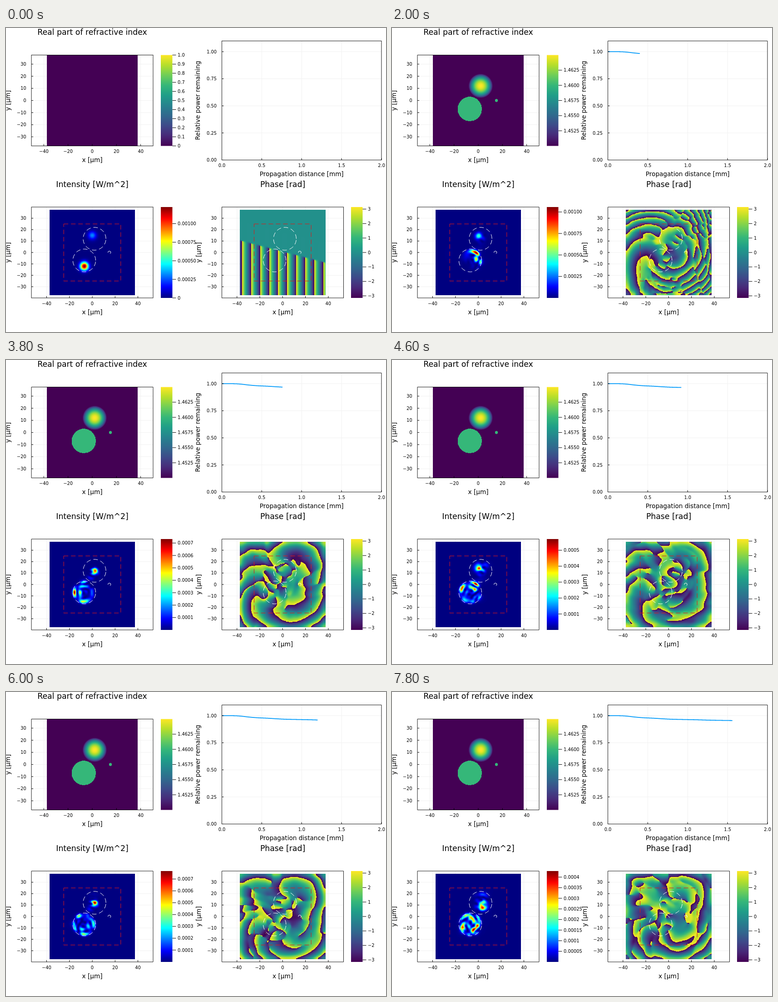
Recreate the animation shown at these times as an HTML page with a canvas. Size 837 by 669 pixels, loop 8000 ms.

```html
<!DOCTYPE html>
<html lang="en">
<head>
<meta charset="utf-8">
<title>Beam propagation</title>
<style>
html, body { margin: 0; width: 100%; height: 100%; overflow: hidden; background: #fff; }
canvas { display: block; }
</style>
</head>
<body>
<canvas id="stage" width="837" height="669"></canvas>
<script>
const ctx = document.getElementById('stage').getContext('2d');
const FRAME_MS = 200, FRAMES = 40, MM_PER_FRAME = 0.04;

// ---------- colour maps ----------
const VIRIDIS = ['440154', '482878', '3e4989', '31688e', '26828e', '1f9e89', '35b779', '6ece58', 'b5de2b', 'fde725']
  .map(hex => [0, 2, 4].map(i => parseInt(hex.slice(i, i + 2), 16)));
const clamp = v => Math.min(1, Math.max(0, v));
function viridis(v) {
  const s = clamp(v) * (VIRIDIS.length - 1), i = Math.min(VIRIDIS.length - 2, Math.floor(s));
  return VIRIDIS[i].map((a, c) => a + (VIRIDIS[i + 1][c] - a) * (s - i));
}
const jet = v => [3, 2, 1].map(c => 255 * clamp(1.5 - Math.abs(4 * clamp(v) - c)));
const table = map => Array.from({ length: 256 }, (_, i) => map(i / 255));
const viridisTable = table(viridis), jetTable = table(jet);

// ---------- beam propagation, lengths in µm ----------
const N = 150, H = 0.5, DZ = 2, FINE = 2 * N, STEPS_PER_FRAME = MM_PER_FRAME * 1000 / DZ;
const K0 = 2 * Math.PI, N0 = 1.46, ABSORB = 3e-4, WAIST = 5, TILT = -0.8;
const coord = (i, n) => (i - (n - 1) / 2) * 75 / n;

function indexAt(x, y) {
  if (Math.hypot(x + 7, y + 7) < 10 || Math.hypot(x - 15, y) < 1.25) return 1.46;
  return 1.45 + 0.015 * Math.max(0, 1 - ((x - 2) ** 2 + (y - 12) ** 2) / 100);
}

const re = new Float64Array(N * N), im = new Float64Array(N * N);
const mulRe = new Float64Array(N * N), mulIm = new Float64Array(N * N);
const lineRe = new Float64Array(N), lineIm = new Float64Array(N);
const gRe = new Float64Array(N), gIm = new Float64Array(N), eRe = new Float64Array(N), eIm = new Float64Array(N);

// Implicit operator 1 + c·δ² (compact Crank-Nicolson) and its factorisation
const cRe = 1 / 16, cIm = -DZ / (4 * K0 * N0 * H * H), cAbs = cRe * cRe + cIm * cIm;
const qRe = (cRe * cRe - cIm * cIm) / cAbs, qIm = -2 * cRe * cIm / cAbs;
for (let i = 0, er = 0, ei = 0; i < N; i++) {
  const dr = 1 - 2 * cRe - (cRe * er - cIm * ei), di = -2 * cIm - (cRe * ei + cIm * er), d = dr * dr + di * di;
  gRe[i] = dr / d; gIm[i] = -di / d;
  er = eRe[i] = cRe * gRe[i] - cIm * gIm[i];
  ei = eIm[i] = cRe * gIm[i] + cIm * gRe[i];
}

let total = 0;
for (let j = 0; j < N; j++) for (let i = 0; i < N; i++) {
  const x = coord(i, N), y = -coord(j, N), k = j * N + i;
  const weak = Math.exp(-(x * x + (y - 15) ** 2) / WAIST ** 2);
  const strong = 2 * Math.exp(-((x + 7) ** 2 + (y + 12) ** 2) / WAIST ** 2);
  re[k] = weak + strong * Math.cos(TILT * x);
  im[k] = strong * Math.sin(TILT * x);
  total += 4 * (re[k] ** 2 + im[k] ** 2);
  let contrast = 0;
  for (const dx of [-0.125, 0.125]) for (const dy of [-0.125, 0.125])
    contrast += (indexAt(x + dx, y + dy) ** 2 - N0 ** 2) / 4;
  const depth = Math.max(0, Math.abs(x) - 25, Math.abs(y) - 25);
  const loss = Math.exp(-DZ * ABSORB * depth * depth), turn = DZ * K0 * contrast / (2 * N0);
  mulRe[k] = loss * Math.cos(turn);
  mulIm[k] = loss * Math.sin(turn);
}
for (let k = 0; k < N * N; k++) { re[k] /= Math.sqrt(total); im[k] /= Math.sqrt(total); }

function diffract(lineStride, stride) {
  for (let l = 0; l < N; l++) {
    const start = l * lineStride;
    let yr = 0, yi = 0;
    for (let i = 0, k = start; i < N; i++, k += stride) {
      const r = gRe[i] * re[k] - gIm[i] * im[k] - eRe[i] * yr + eIm[i] * yi;
      yi = gRe[i] * im[k] + gIm[i] * re[k] - eRe[i] * yi - eIm[i] * yr;
      lineRe[i] = yr = r;
      lineIm[i] = yi;
    }
    yr = yi = 0;
    for (let i = N - 1, k = start + (N - 1) * stride; i >= 0; i--, k -= stride) {
      const r = lineRe[i] - eRe[i] * yr + eIm[i] * yi;
      yi = lineIm[i] - eRe[i] * yi - eIm[i] * yr;
      yr = r;
      const ur = re[k] - yr, ui = im[k] - yi;
      re[k] = yr + qRe * ur - qIm * ui;
      im[k] = yi + qRe * ui + qIm * ur;
    }
  }
}

const power = [1];
function step() {
  diffract(N, 1);
  diffract(1, N);
  let sum = 0;
  for (let k = 0; k < N * N; k++) {
    const r = re[k] * mulRe[k] - im[k] * mulIm[k];
    im[k] = re[k] * mulIm[k] + im[k] * mulRe[k];
    re[k] = r;
    sum += r * r + im[k] * im[k];
  }
  power.push(4 * sum);
}

// ---------- rasters ----------
function raster(values, colors) {
  const canvas = document.createElement('canvas');
  canvas.width = canvas.height = FINE;
  const c = canvas.getContext('2d'), image = c.createImageData(FINE, FINE);
  for (let k = 0; k < FINE * FINE; k++) {
    const [r, g, b] = colors[Math.round(255 * clamp(values[k]))];
    image.data.set([r, g, b, 255], 4 * k);
  }
  c.putImageData(image, 0, 0);
  return canvas;
}

function snapshot() {
  const intensity = new Float64Array(FINE * FINE), phase = new Float64Array(FINE * FINE);
  let max = 0;
  for (let j = 0; j < FINE; j++) for (let i = 0; i < FINE; i++) {
    const ci = i >> 1, cj = j >> 1;
    const ni = Math.min(N - 1, Math.max(0, ci + (i % 2 ? 1 : -1)));
    const nj = Math.min(N - 1, Math.max(0, cj + (j % 2 ? 1 : -1)));
    const blend = f => 0.5625 * f[cj * N + ci] + 0.1875 * (f[cj * N + ni] + f[nj * N + ci]) + 0.0625 * f[nj * N + ni];
    const r = blend(re), m = blend(im), k = j * FINE + i;
    intensity[k] = r * r + m * m;
    phase[k] = Math.atan2(m, r) / (2 * Math.PI) + 0.5;
    max = Math.max(max, intensity[k]);
  }
  return { max, intensity: raster(intensity.map(v => v / max), jetTable), phase: raster(phase, viridisTable) };
}

const snapshots = [snapshot()];
function snapshotAt(n) {
  while (snapshots.length <= n) {
    for (let s = 0; s < STEPS_PER_FRAME; s++) step();
    snapshots.push(snapshot());
  }
  return snapshots[n];
}

const indexValues = Float64Array.from({ length: FINE * FINE }, (_, k) =>
  (indexAt(coord(k % FINE, FINE), -coord(Math.floor(k / FINE), FINE)) - 1.45) / 0.015);
const indexRaster = raster(indexValues, viridisTable);
const emptyRaster = raster(new Float64Array(FINE * FINE), viridisTable);

// ---------- plotting ----------
const TITLE = 17.3, GUIDE = 13.6, TICK = 9.9;
const range = (from, to, by) => Array.from({ length: Math.round((to - from) / by) + 1 }, (_, i) => from + i * by);
const signed = v => String(v).replace('-', '−');

function text(str, x, y, size, align = 'center', turned = false) {
  ctx.save();
  ctx.font = `${size}px "DejaVu Sans", sans-serif`;
  ctx.textAlign = align;
  ctx.fillStyle = '#000';
  ctx.translate(x, y);
  if (turned) ctx.rotate(-Math.PI / 2);
  ctx.fillText(str, 0, 0);
  ctx.restore();
}

function segment(x1, y1, x2, y2, color = '#000', width = 1) {
  ctx.strokeStyle = color;
  ctx.lineWidth = width;
  ctx.beginPath();
  ctx.moveTo(x1, y1);
  ctx.lineTo(x2, y2);
  ctx.stroke();
}

const field = (left, top, cx, cy, scale, yTicks) => ({
  left, top, right: left + 268, bottom: top + 200, cx, cy, sx: scale, sy: scale,
  xTicks: range(-40, 40, 20), yTicks, format: signed, xFormat: signed, xLabel: 'x [µm]', yLabel: 'y [µm]', guideX: left - 47
});
const tens = range(-30, 30, 10);
const indexPlot = { ...field(56, 59.5, 190, 159.5, 2.667, tens), title: 'Real part of refractive index', titleY: 15 };
const intensityPlot = { ...field(56, 394, 190, 494, 2.513, tens), title: 'Intensity [W/m^2]', titleY: 349.5 };
const phasePlot = { ...field(475.5, 394, 609.3, 494, 2.513, tens), title: 'Phase [rad]', titleY: 349.5, guideX: 428.5 };
const powerPlot = {
  left: 475.5, top: 28.5, right: 827, bottom: 290.5, cx: 475.5, cy: 290.5, sx: 175.8, sy: 238.4,
  xTicks: range(0, 2, 0.5), yTicks: range(0, 1, 0.25), xFormat: v => v.toFixed(1), format: v => v.toFixed(2),
  xLabel: 'Propagation distance [mm]', yLabel: 'Relative power remaining', guideX: 427
};
const px = (p, x) => p.cx + x * p.sx, py = (p, y) => p.cy - y * p.sy;

function drawGrid(p) {
  for (const x of p.xTicks) segment(px(p, x), p.top, px(p, x), p.bottom, '#f1f1f1');
  for (const y of p.yTicks) segment(p.left, py(p, y), p.right, py(p, y), '#f1f1f1');
}

function drawAxes(p) {
  ctx.strokeStyle = '#000';
  ctx.lineWidth = 0.9;
  ctx.strokeRect(p.left, p.top, p.right - p.left, p.bottom - p.top);
  for (const x of p.xTicks) {
    segment(px(p, x), p.bottom, px(p, x), p.bottom - 4);
    text(p.xFormat(x), px(p, x), p.bottom + 15.5, TICK);
  }
  for (const y of p.yTicks) {
    segment(p.left, py(p, y), p.left + 4, py(p, y));
    text(p.format(y), p.left - 11.5, py(p, y) + 3.6, TICK, 'right');
  }
  const midX = (p.left + p.right) / 2, midY = (p.top + p.bottom) / 2;
  text(p.xLabel, midX, p.bottom + 35.5, GUIDE);
  text(p.yLabel, p.guideX, midY, GUIDE, 'center', true);
  if (p.title) text(p.title, midX, p.titleY, TITLE);
}

function drawRaster(p, image) {
  const half = 37.5 * p.sx;
  ctx.imageSmoothingEnabled = false;
  ctx.drawImage(image, p.cx - half, p.cy - half, 2 * half, 2 * half);
}

function drawOutlines(p) {
  ctx.save();
  ctx.lineWidth = 1;
  ctx.setLineDash([10, 6]);
  ctx.strokeStyle = '#e01818';
  ctx.beginPath();
  ctx.rect(px(p, -25), py(p, 25), 50 * p.sx, 50 * p.sy);
  ctx.stroke();
  ctx.strokeStyle = '#fff';
  for (const [x, y, r] of [[-7, -7, 10], [15, 0, 1.25], [2, 12, 10]]) {
    ctx.beginPath();
    ctx.arc(px(p, x), py(p, y), r * p.sx, 0, -2 * Math.PI, true);
    ctx.stroke();
  }
  ctx.restore();
}

function colorBar(x, top, colors, low, high, ticks, format) {
  const gradient = ctx.createLinearGradient(0, top + 200, 0, top);
  for (let i = 0; i < 256; i += 5) gradient.addColorStop(i / 255, `rgb(${colors[i].map(Math.round)})`);
  ctx.fillStyle = gradient;
  ctx.fillRect(x, top, 25.5, 200);
  for (const v of ticks) {
    const y = top + 200 * (high - v) / (high - low);
    segment(x + 25.5, y, x + 33.5, y);
    text(format(v), x + 37, y + 3.6, TICK, 'left');
  }
}

function intensityBar(max, first) {
  const by = max > 0.00098 ? 0.00025 : max > 0.0005 ? 0.0001 : 0.00005;
  const ticks = range(first ? 0 : by, Math.floor(max / by) * by, by);
  const format = v => v === 0 ? '0' : by === 0.00025 ? v.toFixed(5) : v.toFixed(5).replace(/0+$/, '');
  colorBar(341, 394, jetTable, 0, max, ticks, format);
}

function drawPower(p, count) {
  ctx.strokeStyle = '#009afa';
  ctx.lineWidth = 1.8;
  ctx.lineJoin = 'round';
  ctx.beginPath();
  for (let i = 0; i <= count; i++) ctx.lineTo(px(p, i * DZ / 1000), py(p, power[i]));
  ctx.stroke();
}

function draw(n) {
  const shot = snapshotAt(n), first = n === 0;
  ctx.fillStyle = '#fff';
  ctx.fillRect(0, 0, 837, 669);
  [indexPlot, powerPlot, intensityPlot, phasePlot].forEach(drawGrid);

  drawRaster(indexPlot, first ? emptyRaster : indexRaster);
  drawRaster(intensityPlot, shot.intensity);
  drawRaster(phasePlot, shot.phase);
  drawOutlines(intensityPlot);
  drawOutlines(phasePlot);
  if (!first) drawPower(powerPlot, n * STEPS_PER_FRAME);

  if (first) colorBar(341, 59.5, viridisTable, 0, 1, range(0, 1, 0.1), v => v ? v.toFixed(1) : '0');
  else colorBar(341, 59.5, viridisTable, 1.45, 1.465, range(1.4525, 1.4625, 0.0025), v => v.toFixed(4));
  intensityBar(shot.max, first);
  colorBar(760, 394, viridisTable, -Math.PI, Math.PI, range(-3, 3, 1), signed);
  [indexPlot, powerPlot, intensityPlot, phasePlot].forEach(drawAxes);
}

let shown = -1;
function tick() {
  const n = Math.floor(performance.now() / FRAME_MS) % FRAMES;
  if (n !== shown) draw(shown = n);
  requestAnimationFrame(tick);
}
tick();
</script>
</body>
</html>
```
